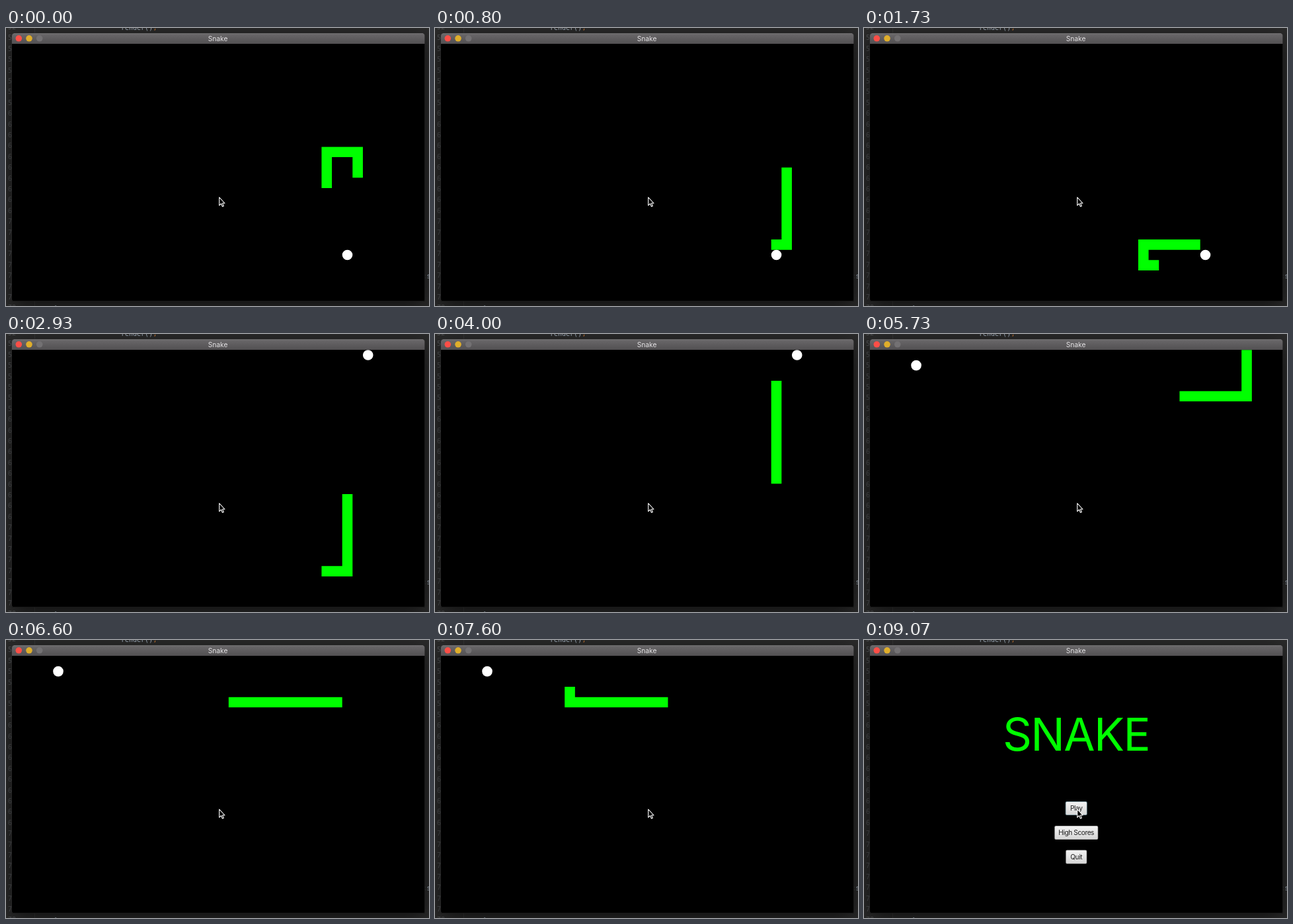
Write an HTML page with a canvas that moves like this. It is 640 by 422 pixels and loops after 9790 ms.

```html
<!DOCTYPE html>
<html lang="en">
<head>
<meta charset="utf-8">
<title>Snake</title>
<style>
html, body { margin: 0; height: 100%; overflow: hidden; background: #000; }
canvas { display: block; }
</style>
</head>
<body>
<canvas id="stage" width="640" height="422"></canvas>
<script>
const ctx = document.getElementById('stage').getContext('2d');
const LOOP = 9790, MENU_TICK = 80, CELL = 15.625, LEFT = 8.7, TOP = 24.2;
const SANS = 'Inter, Roboto, sans-serif';
const MONO = '"DejaVu Sans Mono", monospace';
const GREEN = '#00ff00';

// The head's whole route, as runs of cells.
const DIRS = { U: [0, -1], D: [0, 1], L: [-1, 0], R: [1, 0] };
const route = [[30, 13]];
for (const run of 'U3 R3 D9 L7 D2 R6 U21 R4 D4 L24 U4'.split(' ')) {
  const [dx, dy] = DIRS[run[0]];
  for (let i = +run.slice(1); i > 0; i--) {
    const [x, y] = route[route.length - 1];
    route.push([x + dx, y + dy]);
  }
}
const START = 8;
const foods = [
  { at: [32, 20], eaten: 23 },
  { at: [34, 0], eaten: 45 },
  { at: [4, 1], eaten: Infinity }
];
const center = ([c, r]) => [LEFT + CELL * (c + .5), TOP + CELL * (r + .5)];

function label(str, x, y, size, color, spacing = 0) {
  ctx.font = `${size}px ${SANS}`;
  ctx.letterSpacing = spacing + 'px';
  ctx.textAlign = 'center';
  ctx.fillStyle = color;
  ctx.fillText(str, x, y);
}

function code(str, x, y, color) {
  ctx.font = `10px ${MONO}`;
  ctx.letterSpacing = '0px';
  ctx.textAlign = 'left';
  ctx.fillStyle = color;
  ctx.fillText(str, x, y);
}

function dot(x, y, r, color) {
  ctx.fillStyle = color;
  ctx.beginPath();
  ctx.arc(x, y, r, 0, 7);
  ctx.fill();
}

function box(x, y, w, h, r, fill) {
  ctx.fillStyle = fill;
  ctx.beginPath();
  ctx.roundRect(x, y, w, h, r);
  ctx.fill();
}

function fade(y0, y1, from, to) {
  const g = ctx.createLinearGradient(0, y0, 0, y1);
  g.addColorStop(0, from);
  g.addColorStop(1, to);
  return g;
}

function drawEditor() {
  ctx.fillStyle = '#2b2b2b';
  ctx.fillRect(0, 0, 640, 422);
  ctx.fillStyle = '#383838';
  ctx.fillRect(43, 0, 1, 422);
  for (let n = 52; n < 79; n++) code(n, 3, 2 + 16.4 * (n - 52), '#525457');
  code('render()', 174, 2.6, '#a9b7c6');
  code(';', 222.5, 2.6, '#cc7832');
  code('}', 73, 429, '#a9b7c6');
  code(':s', 630.5, 379.5, '#a9b7c6');
}

function drawWindow() {
  ctx.save();
  ctx.shadowColor = 'rgba(0,0,0,.65)';
  ctx.shadowBlur = 34;
  ctx.shadowOffsetY = 8;
  box(9, 8, 625, 407, [4, 4, 3, 3], '#000');
  ctx.restore();
  box(8.5, 7.5, 625.5, 407, [4, 4, 3, 3], '#303030');
  box(9, 8, 624.5, 406, [4, 4, 2, 2], '#000');
  box(9, 8, 624.5, 16, [4, 4, 0, 0], fade(8, 24, '#6b696b', '#525052'));
  ctx.fillStyle = '#787678';
  ctx.fillRect(12, 8, 619, .7);
  ['#fc4e47', '#dfae2b', '#737173'].forEach((c, i) => dot(19.3 + 15.7 * i, 15.8, 4.8, c));
  label('Snake', 320.6, 19.6, 10.2, '#e6e4e6');
}

function drawGame(tick) {
  const food = foods.find(f => tick < f.eaten);
  const size = 9 + foods.indexOf(food);
  const end = START + tick + 1;
  ctx.beginPath();
  for (const cell of route.slice(end - size, end)) ctx.lineTo(...center(cell));
  ctx.lineWidth = CELL;
  ctx.lineCap = 'square';
  ctx.lineJoin = 'miter';
  ctx.strokeStyle = GREEN;
  ctx.stroke();
  dot(...center(food.at), CELL / 2, '#fff');
}

function button(name, y, w, edge = '#a4a4a4') {
  const x = 321.2 - w / 2;
  box(x, y, w, 21, 2, edge);
  box(x + .8, y + .8, w - 1.6, 19.4, 1.5, fade(y, y + 21, '#f4f4f4', '#d5d5d5'));
  label(name, 321.2, y + 14, 10.1, '#1c1c1c', -.4);
}

function drawMenu() {
  label('SNAKE', 321, 168, 68.5, GREEN, -1.6);
  button('Play', 245, 33, '#66858f');
  button('High Scores', 282, 66);
  button('Quit', 318.7, 32);
}

function drawCursor() {
  const p = new Path2D('M322.7 257V269.3L325.5 266.7L327.4 271L329.3 270.2L327.5 266H331Z');
  ctx.lineWidth = 1.1;
  ctx.lineJoin = 'round';
  ctx.strokeStyle = '#fff';
  ctx.fillStyle = '#000';
  ctx.fill(p);
  ctx.stroke(p);
}

function frame(now) {
  const t = now % LOOP;
  // Ticks alternate between 130 and 70 ms.
  const tick = 2 * Math.floor(t / 200) + (t % 200 >= 130 ? 1 : 0);
  drawEditor();
  drawWindow();
  if (tick < MENU_TICK) drawGame(tick);
  else drawMenu();
  drawCursor();
  requestAnimationFrame(frame);
}
frame(performance.now());
</script>
</body>
</html>
```
